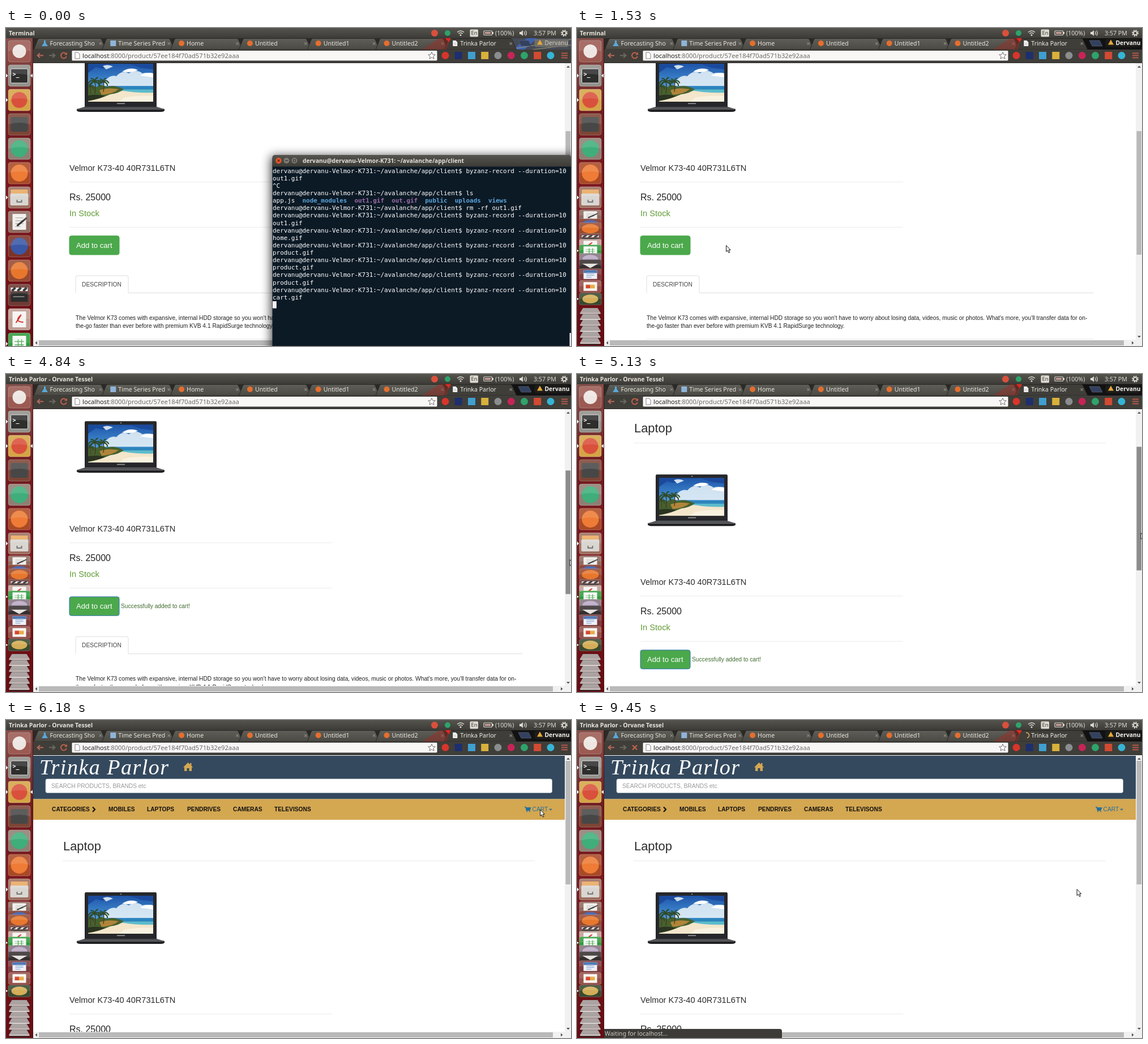
Animation, 998 px wide and 561 px high, one loop 9490 ms. Source, as an HTML page:

```html
<!DOCTYPE html>
<html lang="en">
<head>
<meta charset="utf-8">
<title>Shop checkout</title>
<style>
html, body { margin: 0; width: 100%; height: 100%; overflow: hidden; background: #fff; }
svg { display: block; width: 100vw; height: 100vh; }
text { white-space: pre; font-family: "Liberation Sans", Arial, sans-serif; }
.ui { font-family: "Noto Sans", "Open Sans", sans-serif; }
.b { font-weight: 600; }
.bb { font-weight: 700; }
.mono { font-family: "DejaVu Sans Mono", monospace; }
.logo { font-family: "Liberation Serif", serif; font-style: italic; letter-spacing: 1.5px; }
</style>
</head>
<body>
<svg id="stage" viewBox="0 0 998 561" preserveAspectRatio="none"></svg>
<script>
const LOOP = 9490;
const USER = 'dervanu', HOST = USER + '-Velmor-K731', SHOP = 'Trinka Parlor';
const ITEM = 'Velmor K73-40 40R731L6TN', URL_PATH = ':8000/product/57ee184f70ad571b32e92aaa';

// --- markup helpers; text is placed by the middle of its capitals ---
const rect = (x, y, w, h, fill, more = '') =>
  `<rect x="${x}" y="${y}" width="${w}" height="${h}" fill="${fill}" ${more}/>`;
const disc = (x, y, r, fill, more = '') => `<circle cx="${x}" cy="${y}" r="${r}" fill="${fill}" ${more}/>`;
const path = (d, fill, more = '') => `<path d="${d}" fill="${fill}" ${more}/>`;
const line = (d, color, w = 1, more = '') => path(d, 'none', `stroke="${color}" stroke-width="${w}" ${more}`);
const text = (x, y, s, size, fill, cls = '', more = '') =>
  `<text x="${x}" y="${y + size * .36}" font-size="${size}" fill="${fill}" class="${cls}" ${more}>${s}</text>`;
const group = (id, body, more = '') => `<g id="${id}" ${more}>${body}</g>`;
const shift = (x, y, body) => `<g transform="translate(${x} ${y})">${body}</g>`;
const grad = (id, ...stops) => `<linearGradient id="${id}" x1="0" y1="0" x2="0" y2="1">` +
  stops.map((c, i) => `<stop offset="${i / (stops.length - 1)}" stop-color="${c}"/>`).join('') + '</linearGradient>';
const blur = (id, r) => `<filter id="${id}" x="-20%" y="-20%" width="140%" height="140%"><feGaussianBlur stdDeviation="${r}"/></filter>`;

const defs = `<defs>
  ${grad('bar', '#55544e', '#3c3b37')}${grad('tab', '#5f5e58', '#4a4943')}
  ${grad('dock', '#86504a', '#6f1a1e', '#7b171d', '#741318', '#640d13')}
  ${grad('sky', '#1f55a8', '#3f8ad0', '#b5daf0')}
  <clipPath id="view"><rect x="48" y="62" width="939" height="488"/></clipPath>
  <clipPath id="dockClip"><rect y="18" width="48" height="543"/></clipPath>
  <clipPath id="screen"><rect x="20" y="6" width="115" height="67"/></clipPath>
  ${blur('soft', 3)}${blur('glow', 9)}
</defs>`;

const palm = (x, y, s) => `<g transform="translate(${x} ${y}) scale(${s})">` +
  line('M0 0Q2 10 0 22', '#4a3a22', 1.6) +
  line('M0 0q-8 -6 -12 3M0 0q-9 0 -10 9M0 0q8 -6 12 3M0 0q9 1 9 9M0 0q1 -8 6 -8M0 0q-2 -7 -8 -6', '#2f4a26', 2.4) + '</g>';

const laptop = () =>
  path('M16 0H139Q141 0 141 3V82H14V3Q14 0 16 0Z', '#26272a') +
  '<g clip-path="url(#screen)">' + rect(20, 6, 115, 67, 'url(#sky)') +
  path('M20 6H62L46 15L34 12L20 22ZM92 6H135V16L112 13Z', '#1b4a9c') +
  path('M46 10q9 -4 18 1l-12 5ZM52 34q8 -9 18 -6q10 -12 22 -5q12 -9 24 0q12 -3 19 4v18H46Z', '#eef6fa', 'opacity=".85"') +
  path('M80 20q14 -9 28 -3q-12 6 -28 3ZM112 27q12 -7 23 -4v7Z', '#fff') +
  rect(20, 46, 115, 6, '#2c84bc') + path('M80 51.5H135V58Q104 57 80 54Z', '#5cbccb') +
  path('M20 62Q58 52 84 54Q108 58 135 57V73H20Z', '#f3e6cb') +
  path('M84 66Q110 61 135 63V73H74Z', '#faf2e0') +
  path('M20 48q7 -6 14 0q9 -8 18 -1q14 -5 31 4q-8 7 -24 9q-18 8 -39 12Z', '#46602e') +
  path('M40 53q14 -6 34 -2q-11 9 -30 10Z', '#b0853a') + path('M20 62q16 -3 30 1q-12 6 -30 8Z', '#2b3420') +
  palm(32, 38, .95) + palm(47, 38, .8) + palm(24, 46, .6) + '</g>' +
  disc(78, 3.2, .9, '#c8c8c8') + rect(71, 75.5, 14, 1.6, '#9a9a9a') +
  path('M14 82H141L155 86H0Z', '#4c4d50') + path('M0 86H155V89Q153 91 149 91H6Q2 91 0 89Z', '#202123') +
  rect(0, 85.6, 155, 1, '#77797c');

// --- shop page, in unscrolled stage coordinates ---
const rule = (x, y, w) => rect(x, y, w, 1, '#ebebeb');
const nav = [['CATEGORIES', 81], ['MOBILES', 181], ['LAPTOPS', 249], ['PENDRIVES', 320], ['CAMERAS', 401], ['TELEVISONS', 474]];
const S = 10.23;
const trolley = line('M916 153.5h2l1.5 6h6M918.5 155h8l-1 3h-6', 'currentColor', 1.4) +
  path('M918 154.5h8.5l-1.2 4h-6.3Z', 'currentColor') + disc(920, 161.3, 1, 'currentColor') + disc(925, 161.3, 1, 'currentColor');

const page = rect(48, 62, 939, 740, '#fff') +
  rect(48, 63, 939, 76.5, '#34495e') +
  text(59, 82, SHOP, 38, '#fff', 'logo') +
  path('M313 83.5L321.5 75L325 78.4V76H327.5V81L330.5 83.5H328V90H323.5V85H319.5V90H315V83.5Z', '#d4a751') +
  rect(70, 104, 894.5, 24.5, '#fff', 'rx="3" stroke="#c8ccd0" stroke-width=".7"') +
  text(80, 116.3, 'SEARCH PRODUCTS, BRANDS etc', S, '#999') +
  rect(48, 139.5, 939, 36.5, '#d4a751') +
  nav.map(([s, x]) => text(x, 157.7, s, S, '#111', 'bb')).join('') +
  line('M153 153.5l4 4.2l-4 4.2', '#111', 2.2) +
  rect(905, 139.5, 70, 36.5, '#e7e7e7', 'id="cartOpen"') +
  group('cart', trolley + text(929.5, 157.7, 'CART', S, 'currentColor') + path('M959 156.8h6l-3 3Z', 'currentColor')) +
  text(101, 222, 'Laptop', 21.9, '#2b2b2b') + rule(100, 248, 834) +
  shift(125, 304, laptop()) +
  text(112, 493.3, ITEM, 14.6, '#2b2b2b') + rule(112, 518, 464) +
  text(112, 545, 'Rs. 25000', 16, '#222') +
  text(112, 573.7, 'In Stock', 14.6, '#5f9a33') + rule(112, 598, 464) +
  rect(112, 613.7, 88, 33.3, '#4ba84b', 'id="btn" rx="3.5"') +
  text(124, 630.5, 'Add to cart', 13.15, '#fff') +
  group('msg', text(203, 630, 'Successfully added to cart!', S, '#3f6b2f')) +
  line('M123 714.3V687q0 -3 3 -3h87q3 0 3 3v27.3H912', '#ddd') +
  text(134, 699.5, 'DESCRIPTION', S, '#444') +
  text(123, 758.3, "The Velmor K73 comes with expansive, internal HDD storage so you won't have to worry about losing data, videos, music or photos. What's more, you'll transfer data for on-", S, '#222') +
  text(123, 772.8, 'the-go faster than ever before with premium KVB 4.1 RapidSurge technology.', S, '#222') +
  rule(123, 795, 789);

const menu = rect(793, 178, 182, 140, '#000', 'opacity=".35" filter="url(#soft)"') +
  rect(793.5, 176.5, 181, 139, '#fff', 'rx="2" stroke="#ccc" stroke-width=".8"') +
  `<g transform="translate(802 192) scale(.194 .2)">${laptop()}</g>` +
  text(808, 229, ITEM, S, '#333') + text(808, 243.7, 'Rs.25000', S, '#333') +
  rect(954.5, 261.5, 12.5, 15, '#d9402f', 'rx="2" stroke="#b02a1e"') + text(958.3, 269, 'x', 8.5, '#fff') +
  rect(794, 286, 180, 1, '#e5e5e5') + text(862, 302.3, 'View Cart', S, '#333');

// --- browser frame ---
const cross = (x, y, r, color, w) => line(`M${x - r} ${y - r}l${2 * r} ${2 * r}m0 ${-2 * r}l${-2 * r} ${2 * r}`, color, w);
const tabs = ['Forecasting Sho', 'Time Series Pred', 'Home', 'Untitled', 'Untitled1', 'Untitled2', SHOP];
const tabIcon = (i, x) =>
  i == 0 ? path(`M${x - 1.5} 22h3v4l4 6h-11l4 -6Z`, '#5aa9dc') :
  i == 1 ? rect(x - 5, 22, 10, 10, '#8fb4d8') :
  i == 6 ? group('doc', path(`M${x - 4} 22h5l3 3v7h-8Z`, '#f4f4f4') + line(`M${x - 2} 27h4m-4 2h4`, '#aaa', .7)) :
  disc(x, 27, 5, '#e46e2e');
const tabView = tabs.map((s, i) => {
  const x = 50 + 120.8 * i, last = i == 6;
  return path(`M${x - 1} 38L${x + 6} 20.5Q${x + 7} 18.5 ${x + 9} 18.5H${x + 116}Q${x + 118} 18.5 ${x + 119} 20.5L${x + 127} 38Z`,
    last ? '#3f3e39' : 'url(#tab)', 'stroke="#23221f" stroke-width=".8"') +
    tabIcon(i, x + 18.5) + text(x + 27.5, 27.2, s, 10.6, last ? '#f2f0ea' : '#e8e5dd', 'ui') +
    cross(x + 117, 27.5, 2.2, '#8e8c85', 1.1);
}).join('');

const badge = (fill, color, weight) => rect(933.5, 19.5, 60, 14, fill, 'rx="3"') +
  path('M938 29.5l5 -9l5 9Z', '#e2a93a') + text(951.5, 26, 'Dervanu', 10.3, color, 'ui ' + weight);
const extras = [['#d8352c', 0], ['#1d2f6f', 1], ['#3f9fd0', 1], ['#d8b13c', 1], ['#8a8d8f', 0], ['#c72458', 0], ['#2fa36a', 0], ['#d24a32', 1], ['#35b5d6', 0]];
const browser = rect(48, 18, 950, 20.5, '#2b2a27') +
  group('idleStrip', rect(890, 18, 108, 20.5, '#454a56') + path('M895 38l25 -20h18l-22 20Z', '#3f62b0') +
    line('M900 36L998 20M930 38L998 30', '#a39a78', 1) + badge('#6f6e69', '#cfccc5', '')) +
  group('liveStrip', rect(890, 18, 108, 20.5, '#121212') + badge('#1d1c1b', '#f4f2ec', 'b')) +
  tabView + path('M735 38L765 18h20L778 38Z', '#a02a22', 'opacity=".45"') + path('M776 18h10l-4 7Z', '#e02a22') +
  path('M905 22h18l5 10h-18Z', '#33415f', 'stroke="#5a6478" stroke-width=".7"') +
  rect(48, 38, 950, 24, '#3f3e39') + rect(48, 61, 950, 1, '#2c2b28') +
  line('M66 48.5H56M60 44.5l-4.5 4l4.5 4', '#b5685a', 2) + line('M76 48.5h10M82 44.5l4.5 4l-4.5 4', '#6a6861', 2) +
  group('reload', line('M106 45.5a5 5 0 1 0 .8 4.5', '#c0604c', 2) + path('M108 42.5v5h-5Z', '#c0604c')) +
  group('stop', cross(102, 48.5, 4, '#c0604c', 2.4)) +
  rect(116, 39.5, 646, 18.5, '#f8f7f6', 'rx="2" stroke="#2b2a27" stroke-width=".8"') +
  path('M122 43h5l3 3v8h-8Z', '#fff', 'stroke="#777" stroke-width=".9"') +
  text(135, 48.5, `<tspan fill="#222">localhost</tspan>${URL_PATH}`, 11.2, '#6b6b6b', 'ui') +
  path('M752 42.5l1.8 4.2l4.5 .3l-3.5 2.9l1.2 4.4l-4 -2.4l-4 2.4l1.2 -4.4l-3.5 -2.9l4.5 -.3Z', '#fff', 'stroke="#666" stroke-width=".9"') +
  extras.map(([c, square], i) => {
    const x = 776 + 23.25 * i;
    return square ? rect(x - 6.5, 42, 13, 13, c) : disc(x, 48.5, 6.5, c);
  }).join('') +
  line('M981 44.5h11M981 48.5h11M981 52.5h11', '#b5574a', 2) +
  group('spin', line('M-1 -4.5A4.5 4.5 0 0 1 1 4.5', '#e0ae62', 1.6));

const bars = rect(987, 62, 11, 499, '#f1f1f1') + rect(48, 550, 950, 11, '#f1f1f1') +
  path('M990 70l3 -3.5l3 3.5ZM990 543l3 3.5l3 -3.5ZM55 552.5l-3.5 3l3.5 3ZM980 552.5l3.5 3l-3.5 3Z', '#555') +
  rect(58, 551, 908, 9, '#b9b9b9') + rect(988.5, 72, 8.5, 218, '#b9b9b9', 'id="thumb"');

const status = path('M48 561V545H358Q362 545 362 549V561Z', '#3c3b37') +
  `<text id="statusText" class="ui" x="49" y="556.6" font-size="10.6" fill="#cfccc4"></text>`;

// --- terminal ---
const prompt = `${USER}@${HOST}:~/avalanche/app/client$ `;
const rec = prompt + 'byzanz-record --duration=10';
const ink = (s, c) => `<tspan fill="${c}" font-weight="700">${s}</tspan>`;
const listing = 'app.js  ' + [['node_modules', 1], ['out1.gif'], ['out.gif'], ['public', 1], ['uploads', 1], ['views', 1]]
  .map(([s, dir]) => ink(s, dir ? '#5aa5dc' : '#9a6aa8')).join('  ');
const rows = [rec, 'out1.gif', '^C', prompt + 'ls', listing, prompt + 'rm -rf out1.gif', rec, 'out1.gif', rec, 'home.gif',
  rec, 'product.gif', rec, 'product.gif', rec, 'product.gif', rec, 'cart.gif'];
const terminal = rect(468, 226, 560, 400, '#000', 'opacity=".75" filter="url(#glow)"') +
  path('M470.5 561V230Q470.5 224 476 224H992Q998 224 998 230V561Z', '#0c1a26') +
  path('M470.5 244.5V230Q470.5 224 476 224H992Q998 224 998 230V244.5Z', 'url(#bar)') +
  disc(481.5, 234, 5.2, '#e2572b') + cross(481.5, 234, 1.9, '#5c1f0d', 1.1) +
  disc(495.5, 234, 5, '#7d7b73') + line('M493 234h5', '#33322e', 1.2) +
  disc(509.5, 234, 5, '#7d7b73') + line('M507.5 232h4v4h-4Z', '#33322e', 1) +
  text(524, 234.3, `${USER}@${HOST}: ~/avalanche/app/client`, 10.2, '#e4e1d8', 'ui b') +
  rows.map((s, i) => text(471, 251.7 + 13.13 * i, s, 10.92, '#fff', 'mono')).join('') +
  rect(471, 482, 6.8, 12.5, '#f4f4f4', 'id="caret"') + rect(995.5, 538, 2.5, 23, '#e8e8e8');

// --- launcher: tile colour, icon, folded position ---
const sheet = (c, extra = '') => rect(-12, -14, 24, 28, c, 'rx="1"') + extra;
const stripes = c => line('M-7 -7h14M-7 -2h14M-7 3h14M-7 8h9', c, 1.6);
const plate = ['none', path('M-13 -9H13L18 6H-18Z', '#aaa3a2') + path('M-18 6H18V10H-18Z', '#d8d4d2') + path('M-18 10H18L15 14H-15Z', '#3d2b2c')];
const tiles = [
  ['#9b5a52', disc(0, 0, 12, '#eee6e2')],
  ['#92918b', rect(-15, -12, 30, 25, '#2e2f2d', 'rx="2" stroke="#ddd"') + text(-12, -3, '&gt;_', 10, '#fff', 'mono bb')],
  ['#d5a447', disc(0, 0, 14, '#d9503c')],
  ['#7d4535', rect(-15, -13, 30, 26, '#474747', 'rx="3"')],
  ['#8f7f73', disc(0, 0, 15, '#3fae7b')],
  ['#a94a26', disc(0, 0, 15, '#ee7b36')],
  ['#9d6f60', rect(-15, -14, 30, 9, '#e8a860') + rect(-16, -7, 32, 21, '#d9d6d1', 'rx="2"') + line('M-4 4v4h8v-4', '#777', 2)],
  ['#8f6b60', sheet('#f0efec', stripes('#b5b3ae') + line('M-4 7L13 -7', '#353535', 3)), 331],
  ['#7d3328', disc(0, 0, 15, '#3a58a6'), 347],
  ['#964a30', disc(0, 0, 15, '#e8772e'), 354],
  ['#6e3a34', rect(-15, -5, 30, 17, '#2d2d2d') + rect(-15, -13, 30, 6, '#f0f0f0') + line('M-13 -7l6 -6M-3 -7l6 -6M7 -7l6 -6', '#222', 4) + line('M-11 3h20', '#ccc', 1), 373],
  ['#bf9d94', sheet('#f6f4f2', line('M-6 6Q8 -14 0 -5T7 5', '#d42b22', 2)), 383],
  ['#2f9b3d', sheet('#f4f8f4', line('M-8 -4h16M-8 2h16M-8 8h16M-2 -8v18M4 -8v18', '#4cab55', 1.3)), 393],
  ['#84757f', disc(0, 0, 14, '#bba9c6'), 408],
  ['#352f2f', path('M-14 -6h28l-14 14Z', '#e5e2df'), 419],
  ['#7c3a3c', sheet('#eef2f8', rect(-12, -14, 24, 9, '#3564a8') + stripes('#5d84bd')), 435],
  ['#94524a', sheet('#f8f5f0', path('M-8 -6h8v12h-8Z', '#d4472e') + path('M0 -6h8v12h-8Z', '#e9ab46')), 456],
  ['#364a30', disc(0, 0, 14, '#d3ad58'), 478],
  ...[0, 1, 2, 3, 4, 5].map(i => [...plate, 499 + 10.5 * i])
];
const marker = path('M0 -3.5L3.5 0L0 3.5Z', '#eee');
const marked = [1, 2, 6, 12, 17];
const tileView = ([color, icon], i) => '<g class="tile">' + (color == 'none' ? icon :
  rect(-19.5, -19, 39, 38, color, 'rx="4" stroke="#fff" stroke-opacity=".3" stroke-width=".8"') + icon +
  path('M-19.5 0V-15Q-19.5 -19 -15 -19H15Q19.5 -19 19.5 -15V0Q0 -6 -19.5 0Z', '#fff', 'opacity=".12"')) +
  (marked.includes(i) ? shift(-23.5, 0, marker) : '') + '</g>';
const dock = rect(0, 18, 48, 543, 'url(#dock)') + rect(47, 18, 1, 543, '#4a1214') +
  tiles.map(tileView).join('') + group('focus', path('M47 -3.5L43 0L47 3.5Z', '#fff'));

// --- top panel ---
const panel = rect(0, 0, 998, 18, 'url(#bar)') +
  `<text id="title" class="ui b" x="5" y="12.6" font-size="10.4" fill="#e8e5dc"></text>` +
  disc(757, 9, 6, '#d9503c') + disc(780, 9, 5, '#2fa36a') +
  line('M797 7.5q6 -5 12 0M799.3 10q3.7 -3 7.4 0', '#dedbd2', 1.5) + disc(803, 12.5, 1.5, '#dedbd2') +
  rect(819.5, 2.5, 14.5, 13, '#dedbd2', 'rx="1.5"') + text(821.5, 9, 'En', 9.5, '#3c3b37', 'ui') +
  rect(844, 5, 14.5, 7.5, 'none', 'rx="1" stroke="#dedbd2" stroke-width="1.2"') + rect(846, 7, 10, 3.5, '#c9a09a') + rect(859, 7, 2, 3.5, '#dedbd2') +
  text(864, 9, '(100%)', 10.6, '#dedbd2', 'ui') +
  path('M907 7h2.5l3.5 -3v10l-3.5 -3h-2.5Z', '#dedbd2') + line('M915 6q2.2 3 0 6M917.5 4.5q3.5 4.5 0 9', '#dedbd2', 1.2) +
  text(932, 9, '3:57 PM', 10.6, '#dedbd2', 'ui') +
  disc(986, 9, 3.2, 'none', 'stroke="#dedbd2" stroke-width="1.8"') + disc(986, 9, 5, 'none', 'stroke="#dedbd2" stroke-width="2" stroke-dasharray="2 1.93"');

const edge = 'stroke="#111" stroke-width="1" stroke-linejoin="round"';
const pointer = group('arrow', path('M.6 .6V11.6L3 9.3L5 13.6L6.9 12.7L5 8.6H8.2Z', '#fff', edge)) +
  group('hand', path('M3 1.5q0 -1.5 1.3 -1.5t1.3 1.5v4.5l5 1q2 .4 1.7 2.5l-.8 5.5h-6.5l-4.5 -5.5q-.6 -1 .5 -1.4l2 1.2Z', '#fff', edge));

const stage = document.getElementById('stage');
stage.innerHTML = defs + `<g clip-path="url(#view)">${group('page', page)}${group('menu', menu)}</g>` + bars + browser +
  group('status', status) + group('terminal', terminal) + `<g clip-path="url(#dockClip)">${dock}</g>` + panel + group('mouse', pointer);

const $ = Object.fromEntries([...stage.querySelectorAll('[id]')].map(e => [e.id, e]));
const tileEls = [...stage.querySelectorAll('.tile')];

// --- motion ---
const mouseKeys = [[950, 8, 263], [1270, 263, 383], [1810, 263, 383], [2070, 128, 380], [2830, 128, 380], [3040, 432, 396],
  [3230, 432, 396], [3430, 698, 366], [3610, 698, 366], [3810, 883, 382.5], [4170, 883, 382.5], [4450, 995.5, 340], [4760, 995.5, 340],
  [5130, 995.5, 280], [5550, 995.5, 210], [5690, 995.5, 200], [5850, 995.5, 200], [6280, 935, 151], [6930, 935, 151],
  [7250, 876, 287], [7840, 884, 301], [7960, 884, 303], [9250, 884, 303], [9400, 882.5, 298]];
const scrollKeys = [[4760, 247], [5130, 127], [5550, 32], [5690, 0]];
const smooth = p => p * p * (3 - 2 * p);
const clamp = p => Math.max(0, Math.min(1, p));

function at(keys, t, ease = p => p) {
  const n = keys.findIndex(k => k[0] > t);
  if (n == 0) return keys[0].slice(1);
  if (n < 0) return keys[keys.length - 1].slice(1);
  const a = keys[n - 1], b = keys[n], p = ease((t - a[0]) / (b[0] - a[0]));
  return a.slice(1).map((v, i) => v + (b[i + 1] - v) * p);
}
const between = (t, a, b = LOOP) => t >= a && t < b;
const show = (el, on) => { el.style.display = on ? '' : 'none'; };
const move = (el, x, y, more = '') => el.setAttribute('transform', `translate(${x} ${y}) ${more}`);

function draw(t) {
  const [scroll] = at(scrollKeys, t);
  move($.page, 0, -scroll);
  $.thumb.setAttribute('y', 72 + scroll * .445);
  $.thumb.setAttribute('fill', between(t, 4700, 5800) ? '#8c8c8c' : between(t, 4430, 6000) ? '#a4a4a4' : '#b9b9b9');

  const fold = smooth(clamp((t - 950) / 320));
  tileEls.forEach((el, i) => {
    const full = 41 + 43 * i, end = tiles[i][2] || full;
    move(el, 23.5, full + (end - full) * fold, `scale(1 ${end == full ? 1 : 1 - .45 * fold})`);
  });

  const active = t >= 1530;
  show($.terminal, !active);
  show($.idleStrip, !active);
  show($.liveStrip, active);
  show($.caret, !between(t, 540, 1140));
  $.title.textContent = t < 1590 ? 'Terminal' : SHOP + ' - Orvane Tessel';
  move($.focus, 0, t < 1590 ? 84 : 127);

  $.btn.setAttribute('fill', between(t, 2040, 2860) ? '#449444' : '#4ba84b');
  $.btn.setAttribute('stroke', t >= 2610 ? '#2f74b5' : '#4ba84b');
  show($.msg, t >= 2660);

  const open = between(t, 6510, 8190), loading = t >= 8190;
  show($.menu, open);
  show($.cartOpen, open);
  $.cart.style.color = between(t, 6240, 8190) ? '#2c4a66' : '#2270a0';
  show($.status, t >= 6240);
  $.statusText.textContent = loading ? 'Waiting for localhost...' : t >= 7800 ? 'localhost:8000/cart' : 'localhost' + URL_PATH + '#';
  show($.reload, !loading);
  show($.stop, loading);
  show($.doc, !loading);
  show($.spin, loading);
  move($.spin, 794, 27, `rotate(${(t - 9450) * .36})`);

  const [x, y] = at(mouseKeys, t, between(t, 4760, 5690) ? undefined : smooth);
  const hand = between(t, 2040, 2860) || between(t, 6240, 6970) || between(t, 7700, 9250);
  show($.mouse, t >= 950);
  show($.hand, hand);
  show($.arrow, !hand);
  move($.mouse, x, y);
}

const start = performance.now();
function tick() {
  draw((performance.now() - start) % LOOP);
  requestAnimationFrame(tick);
}
tick();
</script>
</body>
</html>
```
